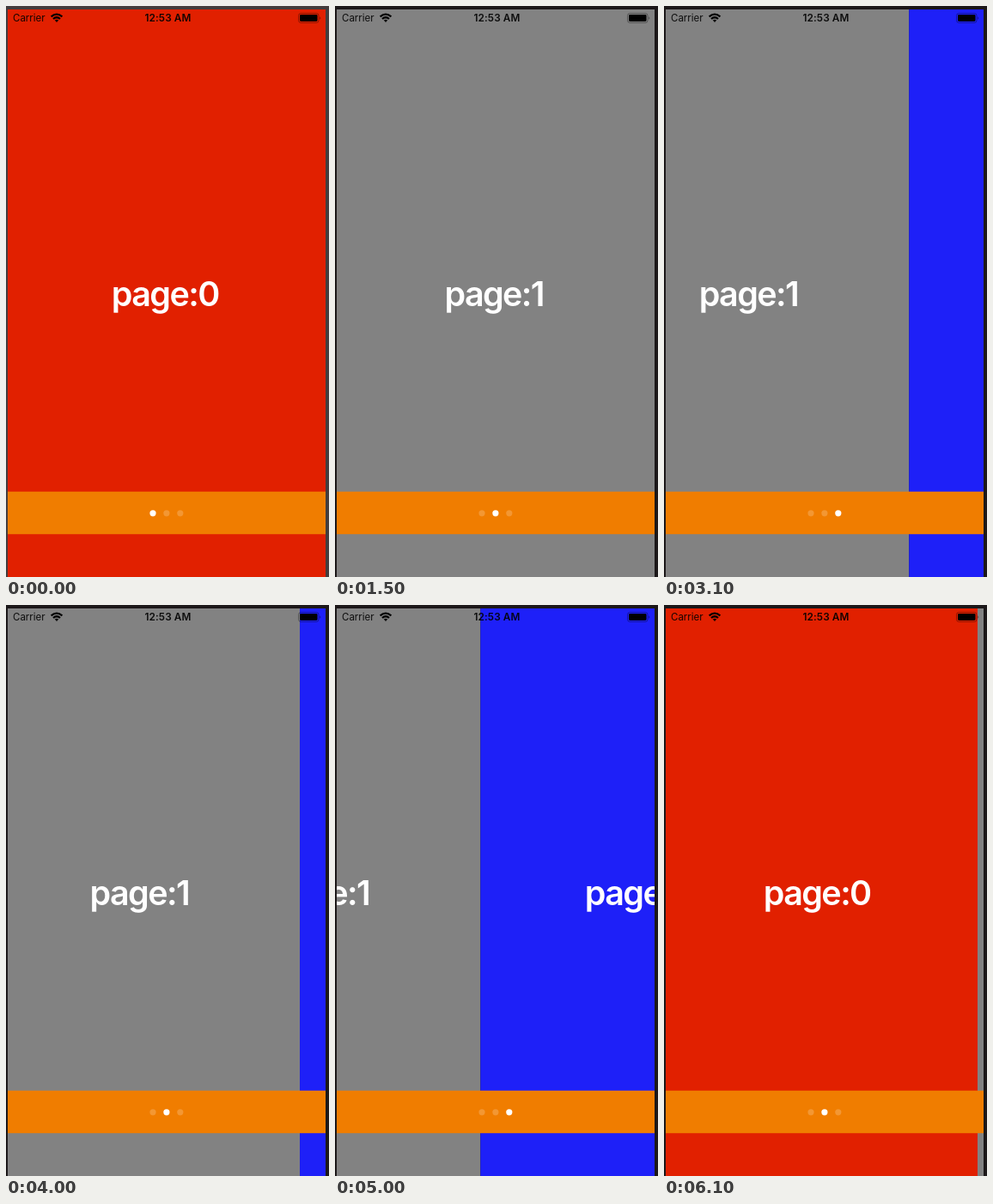
These frames come from a looping animation (376x664 px, 6.2 s). An HTML page:

```html
<!DOCTYPE html>
<html lang="en">
<head>
<meta charset="utf-8">
<title>Page scroller</title>
<style>
  html, body { margin: 0; width: 100%; height: 100%; overflow: hidden; background: #1c1819; }
  svg { display: block; width: 376px; height: 664px; }
  text { font-family: Inter, Roboto, sans-serif; }
  .label { font-size: 39.5px; font-weight: 600; letter-spacing: -1.6px; fill: #fff; text-anchor: middle; }
</style>
</head>
<body>
<svg viewBox="0 0 376 664">
  <defs>
    <clipPath id="screen"><rect x="2" y="4" width="370" height="660"/></clipPath>
  </defs>
  <rect id="bezel" width="376" height="664"/>
  <g clip-path="url(#screen)">
    <g id="pages"></g>
    <rect x="2" y="564.7" width="370" height="49.5" fill="#f07d00"/>
    <g id="dots" fill="#fff"></g>
  </g>
  <g id="status" fill-opacity=".9">
    <text x="8" y="18.3" font-size="11.5">Carrier</text>
    <text x="188.5" y="18.3" font-size="11.8" font-weight="600" text-anchor="middle" letter-spacing=".1">12:53 AM</text>
    <g fill="none" stroke="#000" stroke-width="2.2">
      <path d="M52.6 12.4Q59 6.9 65.4 12.4"/>
      <path d="M55 15Q59 11.5 63 15"/>
    </g>
    <path d="M56.7 16.6Q59 14.8 61.3 16.6L59 19Z"/>
    <rect x="340.5" y="8.5" width="23.5" height="11" rx="2.8" fill="none" stroke="#000" stroke-opacity=".35"/>
    <rect x="342" y="10" width="20.5" height="8" rx="1.4" fill-opacity="1"/>
    <path d="M365.2 12.2Q367.4 14 365.2 15.8Z" fill-opacity=".4"/>
  </g>
</svg>
<script>
const LOOP = 6200, STEP = 100, WIDTH = 370;
const NS = "http://www.w3.org/2000/svg";
const COLORS = ["#e12000", "#828282", "#1e20f8"];

// mid: time halfway across; rate: steepness per step; end: settled, dot updates
const SWIPES = [
  { from: 0, to: 1, start: 500,  mid: 750,  rate: 1.5, end: 1200 },
  { from: 1, to: 2, start: 2000, mid: 2092, rate: 2.5, end: 2600 },
  { from: 2, to: 1, start: 2700, mid: 3009, rate: 1.3, end: 3300 },
  { from: 1, to: 2, start: 4000, mid: 4135, rate: 1.8, end: 4600 },
  { from: 2, to: 1, start: 4800, mid: 5012, rate: 1.6, end: 5300 },
  { from: 1, to: 0, start: 5600, mid: 5837, rate: 1.5, end: 6200 }
];

const $ = id => document.getElementById(id);

function add(parent, tag, attrs, text) {
  const el = document.createElementNS(NS, tag);
  for (const key in attrs) el.setAttribute(key, attrs[key]);
  if (text) el.textContent = text;
  parent.appendChild(el);
  return el;
}

COLORS.forEach((fill, i) => {
  const x = 2 + i * WIDTH;
  add($("pages"), "rect", { x, y: 4, width: WIDTH, height: 660, fill });
  add($("pages"), "text", { x: x + WIDTH / 2 - 1.8, y: 348.6, class: "label" }, "page:" + i);
});

const dots = COLORS.map((_, i) => add($("dots"), "circle", { cx: 171 + 15.9 * i, cy: 589.8, r: 3.6 }));

function stateAt(time) {
  let pos = 0, dot = 0;
  for (const s of SWIPES) {
    if (time < s.start) break;
    if (time >= s.end) {
      pos = dot = s.to;
    } else {
      const part = 1 / (1 + Math.exp(-s.rate * (time - s.mid) / STEP));
      pos = s.from + (s.to - s.from) * part;
    }
  }
  return { pos, dot };
}

function render(ms) {
  const time = Math.floor((ms % LOOP) / STEP) * STEP;
  const { pos, dot } = stateAt(time);
  $("pages").setAttribute("transform", `translate(${(-pos * WIDTH).toFixed(2)} 0)`);
  dots.forEach((el, i) => el.setAttribute("fill-opacity", i === dot ? 1 : 0.2));
  $("bezel").setAttribute("fill", time < 500 ? "#443d3d" : "#1c1819");
}

const origin = performance.now();
function tick() {
  render(performance.now() - origin);
  requestAnimationFrame(tick);
}
tick();
</script>
</body>
</html>
```
